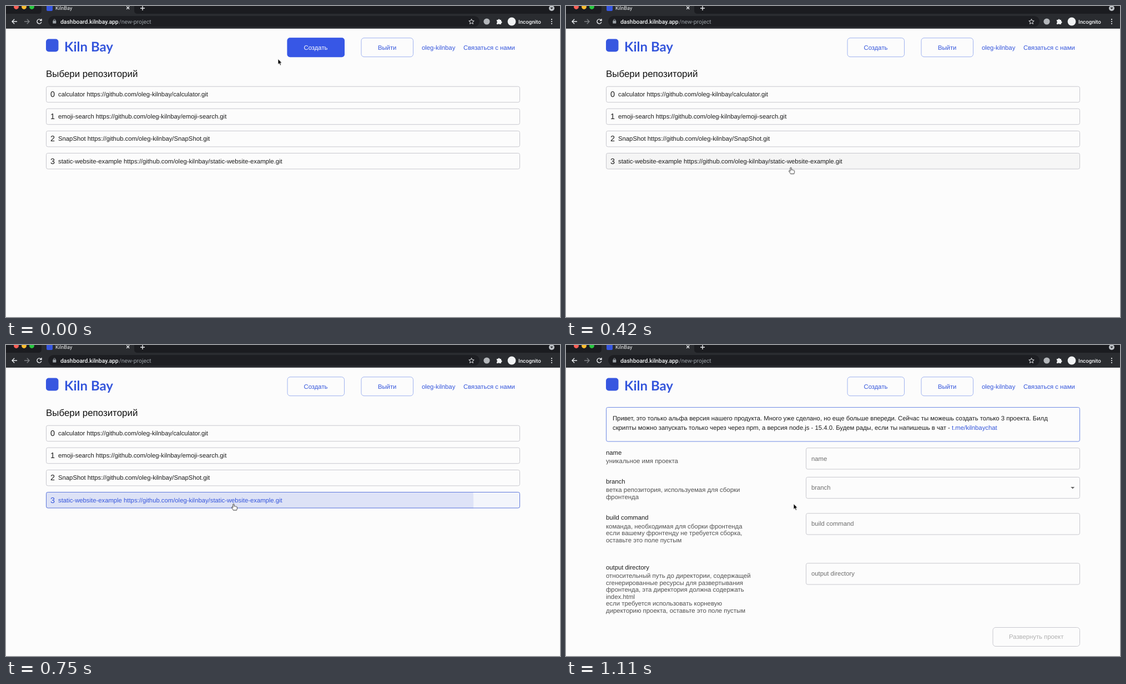
Recreate the animation shown at these times as an HTML page. Size 998 px wide and 561 px high, loop 1.14 s.

```html
<!DOCTYPE html>
<html lang="ru">
<head>
<meta charset="utf-8">
<title>KilnBay</title>
<style>
  html, body { margin: 0; width: 100%; height: 100%; overflow: hidden; background: #fcfcfc; }
  svg { display: block; width: 998px; height: 561px; }
  text { font: 11.3px "Liberation Sans", Arial, sans-serif; fill: #1c1c1c; text-rendering: geometricPrecision; white-space: pre; }
  .ui text { font-family: Roboto, sans-serif; fill: #f1f3f4; }
  .icon { fill: none; stroke: #e8eaed; stroke-width: 1.4; }
  .blue, .blue text { fill: #3556dc; }
  .mid { text-anchor: middle; }
  .brand { font: bold 24px Lato, sans-serif; fill: #3556dc; }
  .title { font-size: 16.9px; fill: #111; }
  .num { font-size: 14.4px; }
  .btn { fill: none; stroke: #9fb2ef; }
  .box { fill: none; stroke: #c8c8ce; }
  .note text { font-size: 11.4px; fill: #515151; }
  .hint text { fill: #6e6e6e; }

  .anim, .hover, .pick text { animation: 1140ms linear infinite; }
  .fade { animation-name: fade; }
  .label { animation-name: label; }
  .list { animation-name: list; }
  .form { animation-name: form; }
  .hover { fill: #000; opacity: 0; animation-name: pass; }
  .pick .hover { animation-name: stay; }
  .pick text { animation-name: ink; }
  .pick .box { animation-name: edge; }
  .tint { fill: #3556dc; animation-name: tint; }
  .ripple { animation-name: spread, glow, wave; }
  .cursor { animation-name: move; }
  .arrow { animation-name: arrow; }
  .hand { animation-name: hand; }

  @keyframes fade {
    0%, 2% { opacity: 1; animation-timing-function: cubic-bezier(.4, 0, .2, 1); }
    15%, 100% { opacity: 0; }
  }
  @keyframes label { 0%, 2% { fill: #fff; } 10%, 100% { fill: #3556dc; } }
  @keyframes list { 0%, 81.56% { visibility: visible; } 81.57%, 100% { visibility: hidden; } }
  @keyframes form { 0%, 81.56% { visibility: hidden; } 81.57%, 100% { visibility: visible; } }
  @keyframes pass { 0%, 8%, 100% { opacity: 0; } 4% { opacity: .035; } }
  @keyframes stay {
    0%, 19% { opacity: 0; }
    21.5%, 22.5% { opacity: .04; }
    27.5%, 34% { opacity: 0; }
    40%, 60.4% { opacity: .052; }
    62%, 100% { opacity: 0; }
  }
  @keyframes ink { 0%, 60.4% { fill: #1c1c1c; } 62%, 100% { fill: #3556dc; } }
  @keyframes edge { 0%, 60.4% { stroke: #c8c8ce; } 62%, 100% { stroke: #5f79dc; } }
  @keyframes tint { 0%, 60.4% { opacity: 0; } 66%, 100% { opacity: .045; } }
  @keyframes spread {
    0%, 53.25% { r: 0; animation-timing-function: cubic-bezier(.4, 0, .2, 1); }
    76%, 100% { r: 516px; }
  }
  @keyframes glow {
    0%, 53% { opacity: 0; }
    54%, 66% { opacity: .11; }
    74% { opacity: .03; }
    81%, 100% { opacity: 0; }
  }
  @keyframes wave { 0%, 60.4% { fill: #000; } 62%, 100% { fill: #3556dc; } }
  @keyframes move {
    0% { transform: translate(490px, 95.5px); animation-timing-function: steps(5); }
    13.15% { transform: translate(400.2px, 218.5px); animation-timing-function: steps(4); }
    23.68% { transform: translate(401.9px, 294.5px); }
    31.57% { transform: translate(401.9px, 294.5px); animation-timing-function: steps(5); }
    44.73%, 100% { transform: translate(410px, 286.5px); }
  }
  @keyframes arrow {
    0%, 7.88% { visibility: visible; }
    7.89%, 23.66% { visibility: hidden; }
    23.67%, 34.19% { visibility: visible; }
    34.2%, 81.56% { visibility: hidden; }
    81.57%, 100% { visibility: visible; }
  }
  @keyframes hand {
    0%, 7.88% { visibility: hidden; }
    7.89%, 23.66% { visibility: visible; }
    23.67%, 34.19% { visibility: hidden; }
    34.2%, 81.56% { visibility: visible; }
    81.57%, 100% { visibility: hidden; }
  }
</style>
</head>
<body>
<svg viewBox="0 0 998 561">
  <defs>
    <clipPath id="row"><rect x="72" y="265" width="854" height="29.5" rx="3"/></clipPath>
  </defs>

  <!-- browser bar -->
  <g class="ui">
    <rect width="998" height="40.6" fill="#1b1c20"/>
    <path d="M0 14H58Q64 14 64 8V0H231V8Q231 14 237 14H998V40.6H0Z" fill="#2a2c30"/>
    <rect x="76" y="18" width="777" height="19.5" rx="9.7" fill="#1d1e22"/>
    <circle cx="18.5" cy="1.5" r="4.4" fill="#fe5f57"/>
    <circle cx="32.5" cy="1.5" r="4.4" fill="#febc2e"/>
    <circle cx="46.5" cy="1.5" r="4.4" fill="#28c840"/>
    <rect x="73" y="-2" width="11" height="11" rx="2" fill="#3757e0"/>
    <text x="89" y="6.5" style="font-size:9.2px">KilnBay</text>
    <path class="icon" d="M217.2 .8l5 5m0-5l-5 5M242 4h8m-4-4v8"/>
    <circle cx="983" cy="4" r="5" fill="#bdc1c6"/>
    <path d="M980.4 2.8h5.2L983 5.8z" fill="#202124"/>
    <path class="icon" d="M20 28H11m4.2-4.2L11 28l4.2 4.2"/>
    <path class="icon" d="M33 28h9m-4.2-4.2L42 28l-4.2 4.2" style="stroke:#7d8084"/>
    <path class="icon" d="M63 25.3a4 4 0 1 0 .8 3.6M64 23v3.2h-3.2"/>
    <rect x="84.3" y="26.6" width="6" height="5" rx=".6" fill="#9aa0a6"/>
    <path class="icon" d="M85.6 27v-1.3a1.7 1.7 0 0 1 3.4 0V27" style="stroke:#9aa0a6;stroke-width:1"/>
    <text x="98" y="31.6" style="font-size:10.4px;font-weight:500">dashboard.kilnbay.app</text>
    <text x="203.5" y="31.6" style="font-size:10.4px;fill:#9aa0a6">/new-project</text>
    <path class="icon" d="M838.5 23.5l1.3 3.1 3.4.3-2.6 2.2.8 3.3-2.9-1.8-2.9 1.8.8-3.3-2.6-2.2 3.4-.3z" style="stroke-width:1"/>
    <circle cx="866" cy="28" r="5.6" fill="#b4b7bb"/>
    <path d="M884 25h2.4a1.6 1.6 0 0 1 3.2 0h2.4v2.6a1.6 1.6 0 0 1 0 3.2V33h-3a1.5 1.5 0 0 0-2.6 0H884v-2.6a1.5 1.5 0 0 0 0-2.8z" fill="#f1f3f4"/>
    <circle cx="911" cy="28" r="7.4" fill="#f1f3f4"/>
    <text x="923" y="31.5" style="font-size:9.7px;font-weight:500">Incognito</text>
    <g fill="#e8eaed">
      <circle cx="983" cy="24.2" r="1.1"/><circle cx="983" cy="28" r="1.1"/><circle cx="983" cy="31.8" r="1.1"/>
    </g>
  </g>

  <!-- header -->
  <rect x="72" y="59.5" width="22.5" height="23" rx="5" fill="#3757e0"/>
  <text class="brand" x="105" y="82">Kiln Bay</text>
  <rect class="btn" x="507" y="57.7" width="102.5" height="34" rx="5"/>
  <rect class="anim fade" x="506.5" y="57.2" width="103.5" height="35" rx="5" fill="#3757e6"/>
  <text class="mid anim label" x="558" y="78.5">Создать</text>
  <rect class="btn" x="640" y="57.7" width="93.5" height="34" rx="5"/>
  <g class="blue">
    <text class="mid" x="686.7" y="78.5">Выйти</text>
    <text x="749" y="78.5">oleg-kilnbay</text>
    <text x="824" y="78.5">Связаться с нами</text>
  </g>

  <!-- repository list -->
  <g class="anim list">
    <text class="title" x="72" y="128.3">Выбери репозиторий</text>
    <g>
      <rect class="hover" x="72" y="145" width="854" height="29" rx="3" style="animation-delay:30ms"/>
      <rect class="box" x="72.5" y="145.2" width="853" height="28.5" rx="3"/>
      <text class="num" x="80" y="164">0</text>
      <text x="94" y="163">calculator https://github.com/oleg-kilnbay/calculator.git</text>
    </g>
    <g>
      <rect class="hover" x="72" y="185" width="854" height="29" rx="3" style="animation-delay:60ms"/>
      <rect class="box" x="72.5" y="185.2" width="853" height="28.5" rx="3"/>
      <text class="num" x="80" y="204">1</text>
      <text x="94" y="203">emoji-search https://github.com/oleg-kilnbay/emoji-search.git</text>
    </g>
    <g>
      <rect class="hover" x="72" y="225" width="854" height="29" rx="3" style="animation-delay:150ms"/>
      <rect class="box" x="72.5" y="225.4" width="853" height="28.5" rx="3"/>
      <text class="num" x="80" y="244.3">2</text>
      <text x="94" y="243.3">SnapShot https://github.com/oleg-kilnbay/SnapShot.git</text>
    </g>
    <g class="pick">
      <rect class="hover" x="72" y="265" width="854" height="29.5" rx="3"/>
      <rect class="anim tint" x="72" y="265" width="854" height="29.5" rx="3"/>
      <g clip-path="url(#row)"><circle class="anim ripple" cx="410.5" cy="286"/></g>
      <rect class="box anim" x="72.5" y="265.5" width="853" height="28.5" rx="3"/>
      <text class="num" x="80" y="284.5">3</text>
      <text x="94" y="283.5">static-website-example https://github.com/oleg-kilnbay/static-website-example.git</text>
    </g>
  </g>

  <!-- project form -->
  <g class="anim form">
    <rect x="72.5" y="112.5" width="853" height="61.5" rx="3" fill="none" stroke="#6f8ae4"/>
    <text x="84" y="136">Привет, это только альфа версия нашего продукта. Много уже сделано, но еще больше впереди. Сейчас ты можешь создать только 3 проекта. Билд</text>
    <text x="84" y="152.5">скрипты можно запускать только через через npm, а версия node.js - 15.4.0. Будем рады, если ты напишешь в чат - <tspan class="blue">t.me/kilnbaychat</tspan></text>

    <text x="72" y="197.5">name</text>
    <text x="72" y="250">branch</text>
    <text x="72" y="315.2">build command</text>
    <text x="72" y="405.2">output directory</text>
    <g class="note">
      <text x="72" y="212.7">уникальное имя проекта</text>
      <text x="72" y="265.3">ветка репозитория, используемая для сборки</text>
      <text x="72" y="277.8">фронтенда</text>
      <text x="72" y="330.6">команда, необходимая для сборки фронтенда</text>
      <text x="72" y="343.1">если вашему фронтенду не требуется сборка,</text>
      <text x="72" y="355.6">оставьте это поле пустым</text>
      <text x="72" y="420.4">относительный путь до директории, содержащей</text>
      <text x="72" y="432.9">сгенерированные ресурсы для развертывания</text>
      <text x="72" y="445.4">фронтенда, эта директория должна содержать</text>
      <text x="72" y="457.9">index.html</text>
      <text x="72" y="470.4">если требуется использовать корневую</text>
      <text x="72" y="482.9">директорию проекта, оставьте это поле пустым</text>
    </g>
    <g class="hint">
      <rect class="box" x="432.5" y="185.7" width="493" height="38.3" rx="3"/>
      <text x="442" y="208.6">name</text>
      <rect class="box" x="432.5" y="238.4" width="493" height="38.3" rx="3"/>
      <text x="442" y="261.3">branch</text>
      <path d="M909.2 256h7l-3.5 3.6z" fill="#666"/>
      <rect class="box" x="432.5" y="303.7" width="493" height="38.3" rx="3"/>
      <text x="442" y="326.4">build command</text>
      <rect class="box" x="432.5" y="393.7" width="493" height="38.3" rx="3"/>
      <text x="442" y="416.4">output directory</text>
    </g>
    <rect class="box" x="769" y="509.5" width="156.5" height="34" rx="5"/>
    <text class="mid" x="847.2" y="530" style="fill:#b0b0b0">Развернуть проект</text>
  </g>

  <!-- pointer -->
  <g class="anim cursor">
    <path class="anim arrow" d="M0 0V10L2.3 7.9 3.9 11.4 5.6 10.7 4.1 7.2H7.1Z" fill="#000" stroke="#fff" stroke-width=".8"/>
    <path class="anim hand" d="M-1.2 7V1.2a1.1 1.1 0 0 1 2.2 0V4.5c.6-.6 1.7-.4 1.9.3 .6-.5 1.6-.2 1.8.5 .8-.3 1.7.2 1.7 1.1V8.5c0 1-.7 1.7-.9 3H-.6C-.8 10-3.4 8-3.7 6.3c.3-.9 1.4-.7 2.5.7z" fill="#fff" stroke="#222" stroke-width=".9"/>
  </g>
</svg>
</body>
</html>
```
